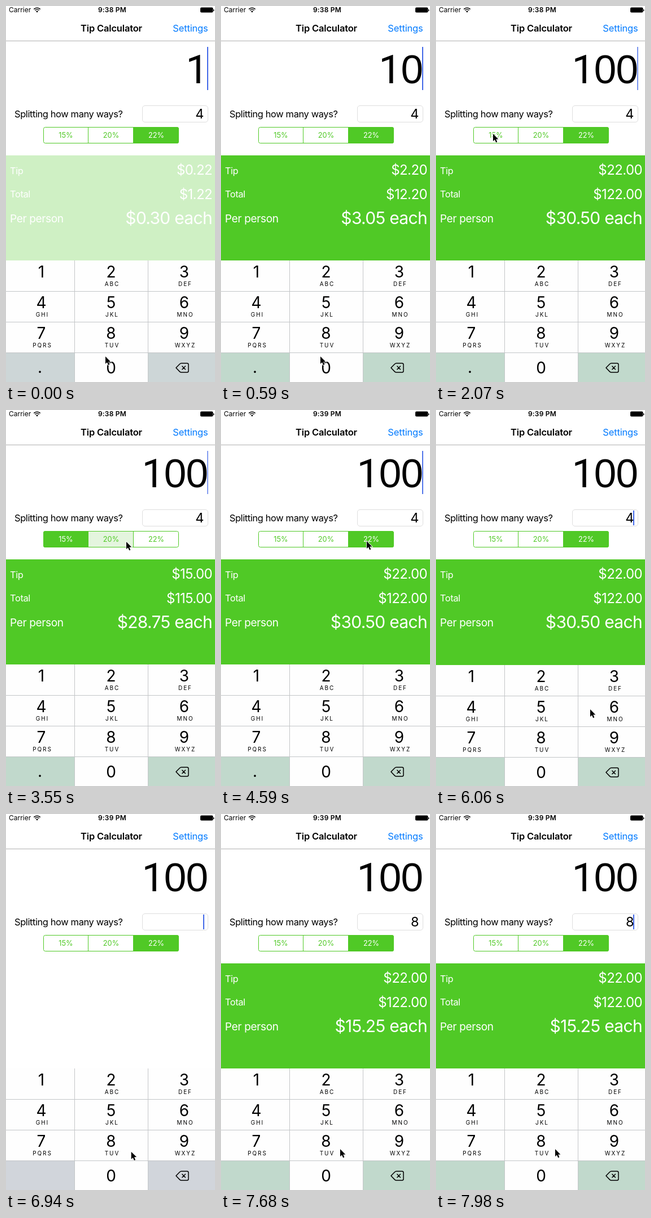
Write an HTML page that moves like this. It is 370 by 662 pixels and loops after 8 s.

```html
<!DOCTYPE html>
<html lang="en">
<head>
<meta charset="utf-8">
<title>Tip Calculator</title>
<style>
  html, body { margin: 0; width: 100%; height: 100%; overflow: hidden; background: #fff; }
  svg { display: block; font-family: Inter, Roboto, sans-serif; --green: #50c926; }
  .body { font-size: 16.5px; letter-spacing: -.42px; }
  .status { font-size: 12px; }
  .nav { font-size: 16.5px; letter-spacing: -.18px; }
  .bold { font-weight: 600; }
  .mid { text-anchor: middle; }
  .end { text-anchor: end; }
  .amount { font: 71px "Liberation Sans", Arial, sans-serif; letter-spacing: -.6px; }
  .one { font-family: Roboto, sans-serif; }
  .money { font-size: 24px; letter-spacing: -.6px; }
  .each { font-size: 30px; letter-spacing: -.7px; }
  .person { font-size: 19.2px; letter-spacing: -.45px; }
  .ways { font-size: 23.5px; }
  .segment { font-size: 12.8px; }
  .digit { font-size: 28px; }
  .letters { font-size: 10px; letter-spacing: 1.9px; }
</style>
</head>
<body>
<svg width="370" height="662" viewBox="0 0 370 662">
  <rect width="370" height="662" fill="#fff"/>
  <text class="status" x="5" y="11">Carrier</text>
  <g fill="none" stroke="#000" stroke-width="1.5">
    <path d="M49.3 5.6a8.2 8.2 0 0 1 11.4 0M51.3 7.8a5.4 5.4 0 0 1 7.4 0"/>
    <path d="M53 9.5a3 3 0 0 1 4 0L55 11.5z" fill="#000" stroke="none"/>
  </g>
  <text class="status bold mid" id="clock" x="188" y="11" letter-spacing=".2"></text>
  <rect x="344" y="2.5" width="22.5" height="9" rx="2"/>
  <path d="M367 5.5q1.5 .5 1.5 2t-1.5 2z"/>
  <text class="nav bold mid" x="186.5" y="45">Tip Calculator</text>
  <text class="nav end" x="357.5" y="45" fill="#007aff">Settings</text>
  <path d="M0 61.5H370" stroke="#b2b2b2"/>

  <text class="amount end" id="amount" x="357.5" y="136"></text>
  <rect id="amountCaret" x="356" y="72" width="2" height="76" fill="#4268e8"/>
  <text class="body" x="15" y="196">Splitting how many ways?</text>
  <rect x="241.5" y="175.5" width="116" height="29" rx="4.5" fill="#fff" stroke="#dedede"/>
  <text class="ways end" id="ways" x="350.5" y="198"></text>
  <rect id="waysCaret" x="349" y="177" width="2" height="26" fill="#4268e8"/>

  <clipPath id="pill"><rect x="66" y="213" width="240" height="29" rx="3.5"/></clipPath>
  <g id="segments" clip-path="url(#pill)"></g>
  <g fill="none" stroke="var(--green)">
    <rect x="66.5" y="213.5" width="239" height="28" rx="3"/>
    <path d="M145.5 213V242M225.5 213V242"/>
  </g>

  <g id="panel" fill="#fff">
    <rect y="263" width="370" height="399" fill="var(--green)"/>
    <text class="body" x="7" y="296">Tip</text>
    <text class="body" x="7" y="337">Total</text>
    <text class="person" x="7" y="381">Per person</text>
    <text class="money end" id="tip" x="365" y="297"></text>
    <text class="money end" id="total" x="365" y="340"></text>
    <text class="each end" id="each" x="365" y="384"></text>
  </g>

  <g id="keyboard">
    <rect y="448" width="370" height="214" fill="#fefefe"/>
    <path id="sideKeys" d="M0 611H121V662H0zM252 611H370V662H252z"/>
    <path d="M0 502.5H370M0 556.5H370M0 610.5H370M121.5 448V662M251.5 448V662" stroke="#c3c6c8"/>
    <g id="keys"></g>
    <text class="digit mid" id="point" x="60" y="646">.</text>
    <path d="M301 637L307.4 630.4Q308.8 629 310.7 629H320.5Q323 629 323 631.5V642.5Q323 645 320.5 645H310.7Q308.8 645 307.4 643.6ZM311.5 633.8L317.9 640.2M317.9 633.8L311.5 640.2" fill="none" stroke="#000" stroke-width="1.5" stroke-linejoin="round"/>
  </g>
  <path id="pointer" d="M0 0V13L3 10.2L5.2 15.2L7.4 14.3L5.3 9.4H9.4Z" stroke="#fff" paint-order="stroke" stroke-width="1.6"/>
</svg>
<script>
const LOOP = 8000, TICK = 147.7;
const ERASE = 6440, RETYPE = 7240;
const rates = [15, 20, 22];
const taps = [{ at: 2600, segment: 0 }, { at: 3660, segment: 1 }, { at: 4425, segment: 2 }];
const glides = [
  { at: 1030, lasts: 1040, x: 101, y: 225 },
  { at: 2950, lasts: 595, x: 213, y: 232 },
  { at: 3950, lasts: 300, x: 258, y: 231 },
  { at: 4870, lasts: 595, x: 340, y: 191 },
  { at: 5760, lasts: 295, x: 273, y: 527 },
  { at: 6055, lasts: 295, x: 309, y: 633 },
  { at: 6640, lasts: 380, x: 211, y: 590 }
];

const $ = id => document.getElementById(id);
const clamp = v => Math.max(0, Math.min(1, v));
const mix = (a, b, k) => a + (b - a) * k;
const ramp = (t, at, lasts) => clamp((t - at) / lasts);
const smooth = k => k * k * (3 - 2 * k);
const easeOut = k => 1 - (1 - k) ** 3;

function pointerAt(t) {
  return glides.reduce((from, { at, lasts, x, y }) => {
    const k = smooth(ramp(t, at, lasts));
    return [mix(from[0], x, k), mix(from[1], y, k)];
  }, [176, 617]);
}

function caretAlpha(t, start) {
  const phase = (t - start + LOOP) / 1000 % 1;
  const off = Math.abs(phase - .29);
  return clamp((.35 - Math.min(off, 1 - off)) / .13);
}

// Rounds down to whole cents
function dollars(value) {
  return "$" + (Math.floor(value * 100 + .001) / 100).toFixed(2);
}

function setText(id, text) {
  if ($(id).textContent !== text) $(id).textContent = text;
}

$("segments").innerHTML = rates.map((rate, i) =>
  `<rect x="${66 + 80 * i}" y="213" width="80" height="29"/>
   <text class="segment mid" x="${106 + 80 * i}" y="232">${rate}%</text>`).join("");

const letters = ["", "ABC", "DEF", "GHI", "JKL", "MNO", "PQRS", "TUV", "WXYZ"];
$("keys").innerHTML = letters.map((word, i) => {
  const x = 62.5 + 126.5 * (i % 3) - (i % 3 === 1 ? 3 : 0);
  const y = 478 + 54 * Math.floor(i / 3);
  return `<text class="digit mid" x="${x}" y="${y}">${i + 1}</text>
    <text class="letters mid" x="${x + 2}" y="${y + 15}">${word}</text>`;
}).join("") + `<text class="digit mid" x="186" y="647">0</text>`;

const segmentRects = [...document.querySelectorAll("#segments rect")];
const segmentTexts = [...document.querySelectorAll("#segments text")];
let shownAmount;

function drawSegments(t) {
  const done = taps.filter(tap => tap.at <= t);
  const selected = done.length ? done.pop().segment : 2;
  const pressed = taps.find(tap => t < tap.at && t >= tap.at - 150);
  segmentRects.forEach((rect, i) => {
    const on = i === selected;
    const held = pressed && pressed.segment === i;
    rect.setAttribute("fill", on ? "var(--green)" : held ? "#e4f5de" : "#fff");
    segmentTexts[i].setAttribute("fill", on ? "#fff" : "var(--green)");
  });
  return rates[selected] / 100;
}

function draw(t) {
  const amount = t < 400 ? 1 : t < 700 ? 10 : 100;
  const ways = t < ERASE ? "4" : t < RETYPE ? "" : "8";
  const tip = amount * drawSegments(t);

  if (amount !== shownAmount) {
    $("amount").innerHTML = String(amount).replace("1", '<tspan class="one">1</tspan>');
    shownAmount = amount;
  }
  setText("clock", t < 4130 ? "9:38 PM" : "9:39 PM");
  setText("ways", ways);
  setText("tip", dollars(tip));
  setText("total", dollars(amount + tip));
  setText("each", dollars((amount + tip) / (ways || 4)) + " each");

  const alpha = ramp(t, -160, 600) - ramp(t, ERASE, 360) + ramp(t, RETYPE, 440);
  const tint = [mix(209, 193, alpha), mix(213, 217, alpha), mix(219, 204, alpha)];
  $("panel").style.opacity = alpha;
  $("sideKeys").setAttribute("fill", `rgb(${tint.map(Math.round)})`);

  const drop = 214 * (easeOut(ramp(t, 4800, 440)) - easeOut(ramp(t, 5690, 440)));
  $("keyboard").setAttribute("transform", `translate(0 ${drop})`);
  $("point").style.opacity = t < 5500 ? 1 : 0;
  $("amountCaret").style.opacity = t < 1000 ? 1 : t < 4870 ? caretAlpha(t, 1520) : 0;
  $("waysCaret").style.opacity = t < 5750 ? 0 : caretAlpha(t, 5800);
  $("pointer").setAttribute("transform", `translate(${pointerAt(t)})`);
}

const start = performance.now();
function frame() {
  const t = (performance.now() - start) % LOOP;
  draw(Math.floor((t + 6) / TICK) * TICK);
  requestAnimationFrame(frame);
}
frame();
</script>
</body>
</html>
```
